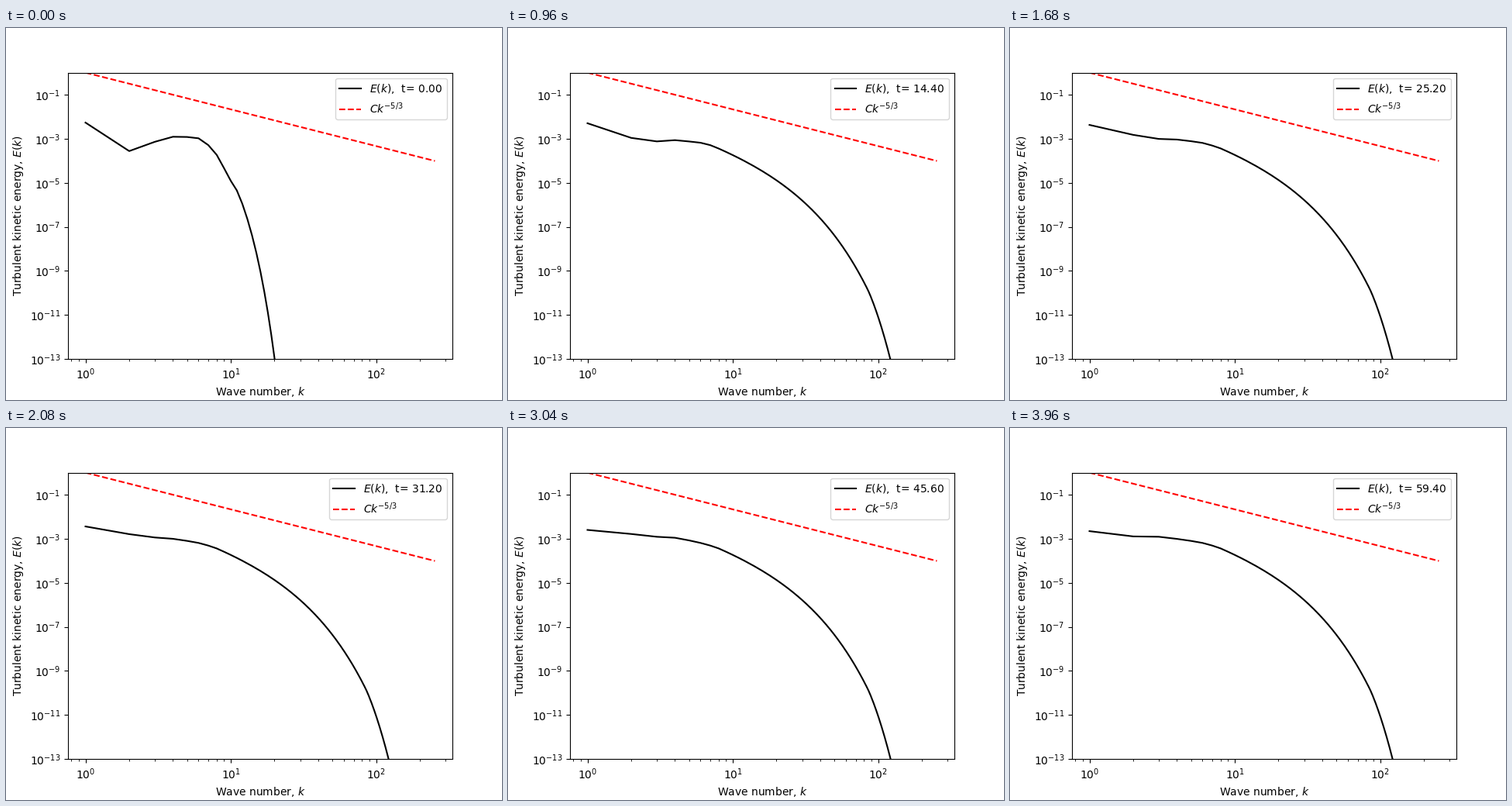
Animation, 640 px wide and 480 px high, one loop 4000 ms. Source, as a matplotlib script:

```python
import numpy as np
import matplotlib.pyplot as plt
from matplotlib.animation import FuncAnimation

FRAMES, INTERVAL, DT = 100, 40, 0.6
K = np.arange(1, 255)
LOG_K = np.log10(K)
SMALL = K >= 7          # small scales, below the energetic modes
FILTER_K = 85
FILLED = 7.2            # time when the cascade has reached the filter
SPREAD = 2.3
LEVELS = np.linspace(-3.3, -14.5, 400)


def fade(t, tau):
    return np.exp(-t / tau)


def step(t, mid, width):
    return 1 / (1 + np.exp((mid - t) / width))


def large_modes(t):
    """log10 E of wave numbers 1 to 7."""
    end = FRAMES * DT
    swing = np.sin(2 * np.pi * t / end)
    return [
        -2.26 - 0.41 * step(t, 33, 8),
        -2.74 - 0.82 * fade(t, 11) - 0.16 * (t / end) ** 6,
        -3.14 + 0.23 * step(t, 24, 4),
        -3.01 + 0.10 * fade(t, 3) - 0.055 * swing,
        -3.10 + 0.18 * fade(t, 3) - 0.025 * swing,
        -3.19 + 0.21 * fade(t, 4.5),
        -3.31 + 0.06 * np.exp(-((t - 7) / 7) ** 2),
    ]


def developed(t):
    """Power law with a viscous decay and an extra drop past the filter."""
    g = fade(max(t - FILLED, 0), 3)
    beyond = np.maximum(K - FILTER_K, 0) ** 1.4
    return (-3.735 - 0.085 * g
            - (1.84 + 0.20 * g) * (LOG_K - 1)
            - (0.0584 + 0.0015 * g) * (K - 10)
            - (0.0047 + 0.0007 * g) * beyond)


def initial():
    d = K - 7
    return -3.285 - 0.40 * d - 0.0265 * d ** 2 - 0.22 * np.exp(-(K - 9.6) ** 2)


def reach(log_e):
    """log10 k at which a falling spectrum passes each level."""
    return np.interp(-LEVELS, -log_e[SMALL], LOG_K[SMALL])


def cascade(t):
    """The steep initial tail spreading out to small scales."""
    g = (1 - fade(t, SPREAD)) / (1 - fade(FILLED, SPREAD))
    front = (1 - g) * reach(initial()) + g * reach(developed(t))
    return np.interp(LOG_K, front, LEVELS, right=-16)


def spectrum(t):
    log_e = cascade(t) if t < FILLED else developed(t)
    log_e[:7] = large_modes(t)
    return 10 ** np.maximum(log_e, -20)


def label(t):
    # the whole part is set as math so that no kerning pulls in the point
    whole, part = f"{t:.2f}".split(".")
    return f"$E(k)$,  t= ${whole}$.{part}"


fig, ax = plt.subplots(figsize=(6.4, 4.8), dpi=100)
line, = ax.loglog(K, spectrum(0), "k-", label=label(0))
ax.loglog(K, K ** (-5 / 3), "r--", label="$Ck^{-5/3}$")
ax.set_ylim(1e-13, 1)
ax.set_xlabel("Wave number, $k$")
ax.set_ylabel("Turbulent kinetic energy, $E(k)$")
legend = ax.legend(loc="upper right")


def update(i):
    t = i * DT
    line.set_ydata(spectrum(t))
    legend.get_texts()[0].set_text(label(t))
    return line, legend


anim = FuncAnimation(fig, update, frames=FRAMES, interval=INTERVAL, repeat=True)
plt.show()
```
